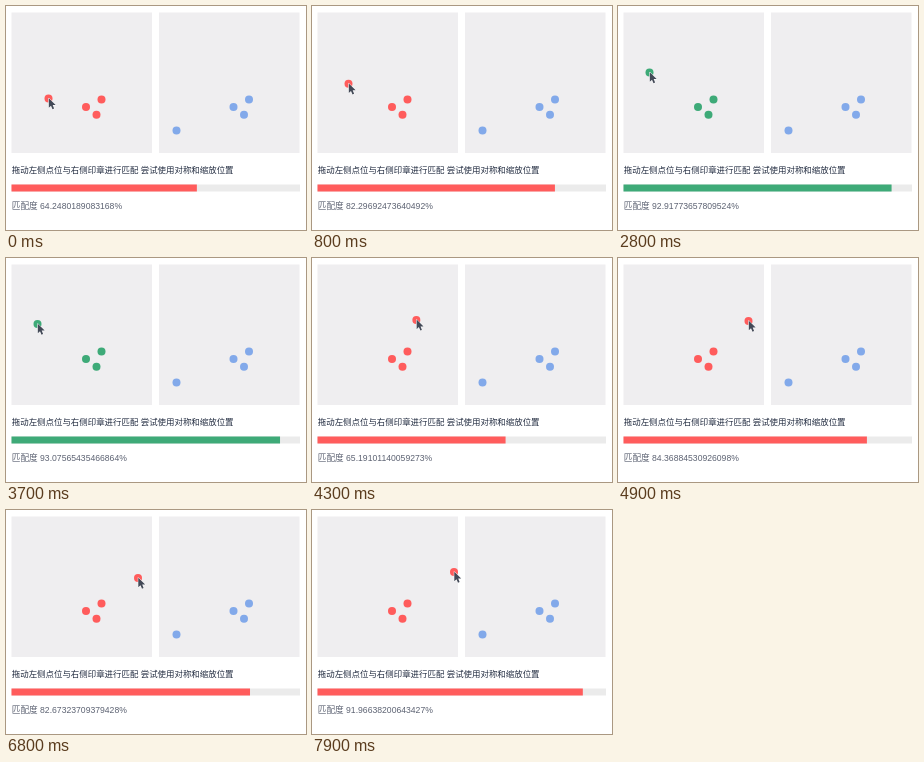
Recreate the animation shown at these times as an HTML page with a canvas. Size 300 by 224 pixels, loop 8 s.

```html
<!DOCTYPE html>
<html lang="zh">
<meta charset="utf-8">
<style>
html, body { margin: 0; width: 300px; height: 224px; overflow: hidden; background: #fff; }
canvas { display: block; }
</style>
<canvas id="stage" width="300" height="224"></canvas>
<script>
const ctx = document.getElementById('stage').getContext('2d');
const LOOP = 8000, STEP = 100;
const RED = '#ff5c5c', GREEN = '#3eaa78', BLUE = '#82a9ea', PANEL = '#efeef0';
const SIDE = 140.5, SHIFT = 147.5, BAR = 288.5;
const fixed = [[95.5, 93.5], [80, 101], [90.5, 108.8]];

// Stops of the drag: time, x, y, match score
const stops = [
  [0, 42.5, 92.5, 64.2480189083168],
  [1600, 34.5, 72.8, 88.31322667910095],
  [2800, 31.5, 66.5, 92.91773657809525],
  [3700, 31.5, 66, 93.07565435466865],
  [4100, 84, 61, 50.27491836051742],
  [4900, 130.5, 63, 84.36884530926098],
  [6000, 138.5, 59.3, 91.27460815934726],
  [6800, 132, 68, 82.67323709379428],
  [7900, 142, 62, 91.96638200643427]
];

const easeOut = u => u * (2 - u);

function poseAt(t) {
  const i = stops.findLastIndex(s => s[0] <= t);
  const [a, b = a] = stops.slice(i, i + 2);
  const u = easeOut((t - a[0]) / (b[0] - a[0] || 1));
  return a.map((v, n) => v + (b[n] - v) * u).slice(1);
}

function rect(color, x, y, w, h) {
  ctx.fillStyle = color;
  ctx.fillRect(x, y, w, h);
}

function dot(color, x, y) {
  ctx.fillStyle = color;
  ctx.beginPath();
  ctx.arc(x, y, 4, 0, 2 * Math.PI);
  ctx.fill();
}

function text(color, style, str, y) {
  ctx.font = `${style} "Liberation Sans", "Noto Sans CJK SC", "Noto Sans CJK", sans-serif`;
  ctx.fillStyle = color;
  ctx.fillText(str, 5.8, y);
}

const arrow = new Path2D('M0 0V9.6L2.2 7.5 3.7 11 5.3 10.3 3.9 6.9H6.9Z');

function cursor(x, y) {
  ctx.save();
  ctx.translate(x, y);
  ctx.lineWidth = 1;
  ctx.lineJoin = 'round';
  ctx.strokeStyle = '#fff';
  ctx.stroke(arrow);
  ctx.fillStyle = '#434957';
  ctx.fill(arrow);
  ctx.restore();
}

function draw(now) {
  const t = Math.floor(now % LOOP / STEP) * STEP;
  const [x, y, score] = poseAt(t);
  const color = score > 92.5 ? GREEN : RED;

  rect('#fff', 0, 0, 300, 224);
  for (const left of [5.5, 5.5 + SHIFT]) rect(PANEL, left, 6.5, SIDE, SIDE);
  for (const [px, py] of fixed) {
    dot(color, px, py);
    dot(BLUE, px + SHIFT, py);
  }
  dot(BLUE, 170.5, 124.5);
  dot(color, x, y);

  rect('#ebebeb', 5.5, 178.5, BAR, 7);
  rect(color, 5.5, 178.5, BAR * score / 100, 7);

  text('#222c40', '500 8.45px', '拖动左侧点位与右侧印章进行匹配 尝试使用对称和缩放位置', 167);
  text('#5c6272', '8.65px', `匹配度 ${score}%`, 203);
  cursor(x + 0.3, y - 0.3);
  requestAnimationFrame(draw);
}
requestAnimationFrame(draw);
</script>
</html>
```
